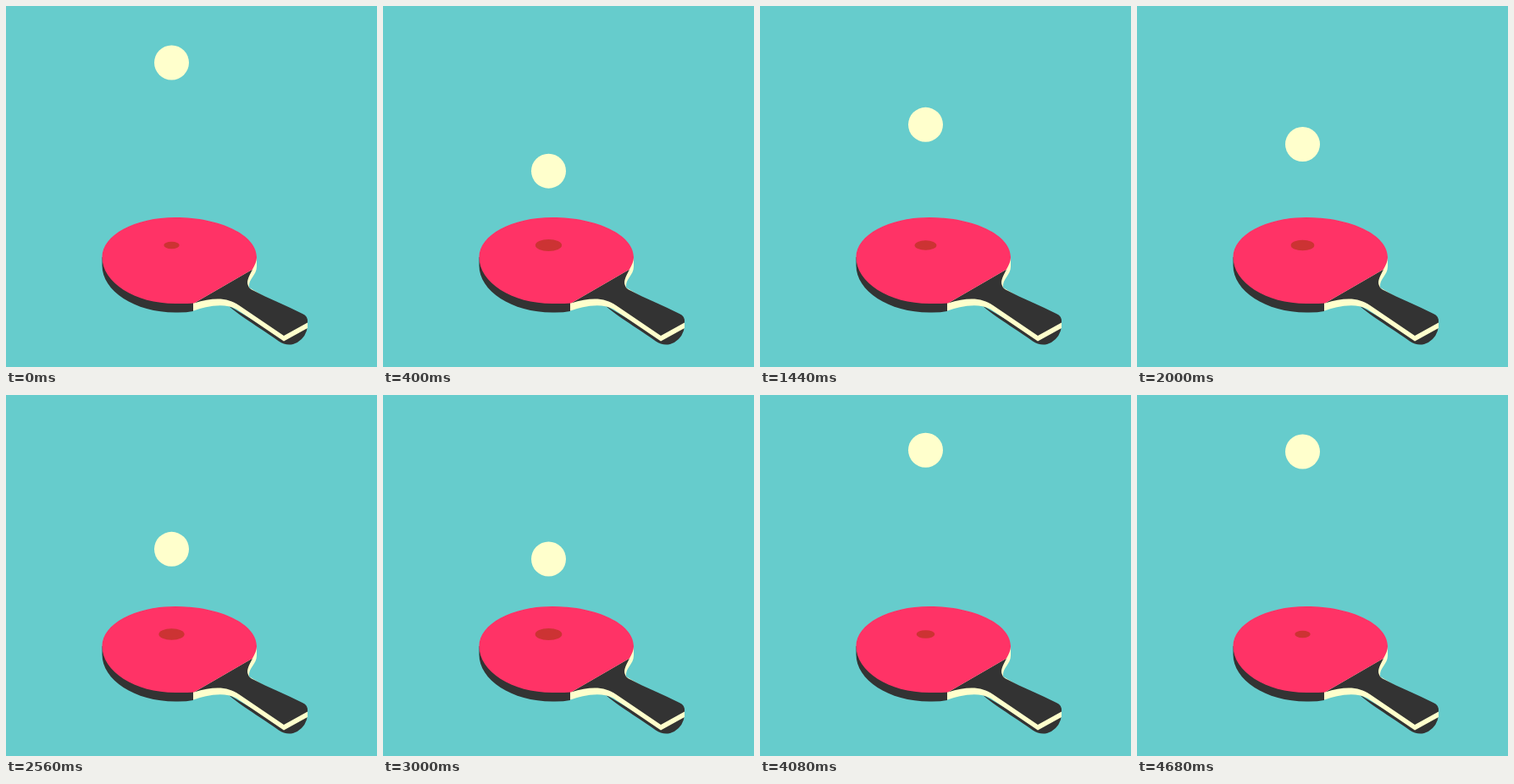
These frames come from a looping animation (438x427 px, 4720 ms). An HTML page:

```html
<!DOCTYPE html>
<html lang="en">
<head>
<meta charset="utf-8">
<title>Bouncing ball</title>
<style>
  html, body { margin: 0; width: 100%; height: 100%; overflow: hidden; background: #6cc; }
  svg { display: block; width: 100%; height: 100%; }
</style>
</head>
<body>
<svg viewBox="0 0 438 427">
  <g id="paddle">
    <path fill="#333" d="M113.5 297V307C113.500 337 152 362.500 200 362.500Q212 362.800 221 361V340L200 300Z"/>
    <path fill="#333" d="M262 354C275 366 305 384 322 396.500Q330 402 339 400Q351 396 355 384L356 377L327 392Z"/>
    <path fill="#ffc" d="M221 350L230 346L288 311L296 298V308C296 319 286 322 287 333L356 374V381L328 396.500L272 358.500C256 350 235 356 221 360.500Z"/>
    <path fill="#333" d="M222 351.500L291 311.500C288 318 283 325 286 331C287 334 289 335 292 336.500C310 346 330 354 350 364Q357 367 356 374.500L328 390L275 354C262 345 246 344 222 351.500Z"/>
    <path fill="#f36" d="M113.500 297C113.500 327 152 352 200 352Q212 352.300 222 351.500L291 311.500C294 306 296 302 296 297C296 271 253 250 200 250C152 250 113.500 271 113.500 297Z"/>
  </g>
  <ellipse id="shadow" cx="195.500" cy="283" fill="#c33"/>
  <circle id="ball" cx="195.500" r="20.500" fill="#ffc"/>
</svg>
<script>
const LOOP = 4720, STEP = 40;
const GROUND = 264, WIDEST = 19;

// Top of each bounce: time, ball height, shadow radius
const peaks = [
  [120, 67, 9.2], [780, 104, 11.3], [1360, 130, 12.4], [1912, 151, 13.2],
  [2435, 156, 13.9], [2910, 181, 15.2], [3330, 204, 16], [3960, 40.5, 9.8], [4660, 67, 9.2]
];

const [paddle, shadow, ball] = ['paddle', 'shadow', 'ball'].map(id => document.getElementById(id));
const fallTime = peak => Math.sqrt(GROUND - peak[1]);

function bounce(time) {
  const next = peaks.findIndex(peak => peak[0] > time);
  if (next < 1) return { y: peaks[0][1], radius: peaks[0][2] };   // rest at the top
  const from = peaks[next - 1], to = peaks[next];
  const down = fallTime(from), up = fallTime(to);
  const hit = from[0] + (to[0] - from[0]) * down / (down + up);
  const peak = time < hit ? from : to;
  const drop = ((time - peak[0]) / (hit - peak[0])) ** 2;
  return {
    y: peak[1] + (GROUND - peak[1]) * drop,
    radius: peak[2] + (WIDEST - peak[2]) * drop
  };
}

function swing(time) {
  const u = (time - 3140) / 400;
  return u > 0 && u < 1 ? -10.4 * (1 - Math.cos(2 * Math.PI * u)) / 2 : 0;
}

function draw(now) {
  const time = Math.floor(now % LOOP / STEP) * STEP;
  const { y, radius } = bounce(time);
  const angle = swing(time);
  ball.setAttribute('cy', y);
  shadow.setAttribute('rx', radius);
  shadow.setAttribute('ry', radius * 0.45);
  shadow.setAttribute('transform', `rotate(${angle} 195.5 283)`);
  paddle.setAttribute('transform', `rotate(${angle} 219 326.5)`);
}

let start;
function tick(now) {
  start ??= now;
  draw(now - start);
  requestAnimationFrame(tick);
}
draw(0);
requestAnimationFrame(tick);
</script>
</body>
</html>
```
